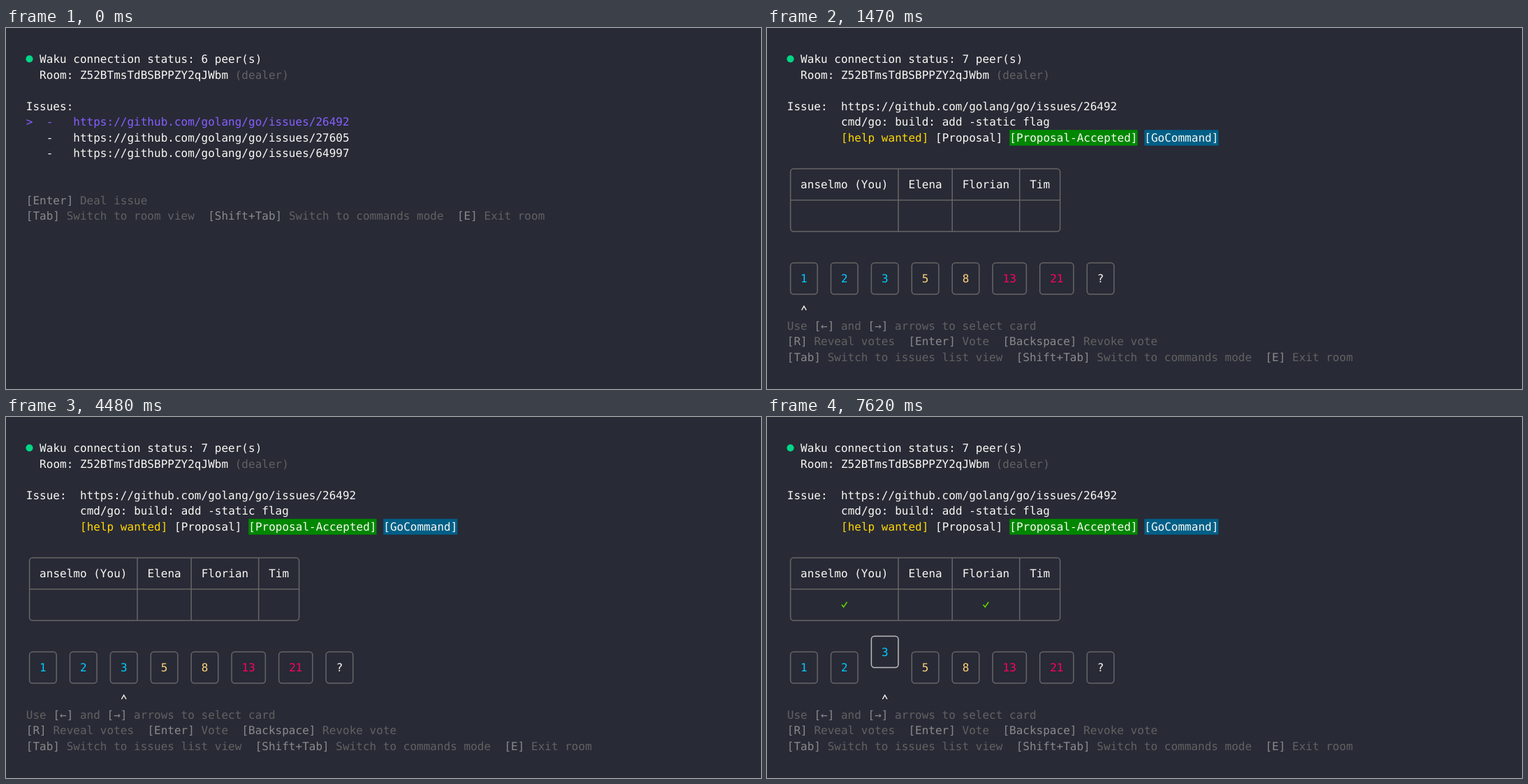
An HTML page that plays this animation: 1081 by 518 pixels, repeating every 8 s.

```html
<!DOCTYPE html>
<html lang="en">
<head>
<meta charset="utf-8">
<title>Planning poker in a terminal</title>
<style>
  html, body { margin: 0; width: 100%; height: 100%; overflow: hidden; background: #282a36; }
  svg { display: block; width: 100%; height: 100%; }
  text {
    font: 16.03px "DejaVu Sans Mono", "Noto Sans Mono", monospace;
    white-space: pre;
    text-rendering: geometricPrecision;
    font-variant-ligatures: none;
  }
  .line { fill: none; stroke-width: 1.5; }
</style>
</head>
<body>
<svg id="stage" viewBox="0 0 1081 518" xmlns="http://www.w3.org/2000/svg"></svg>
<script>
const LOOP = 8000;
const CELL = 9.65, ROW = 22.5, LEFT = 28.8, TOP = 44.5;
const C = {
  fg: '#f8f8f2', key: '#8a8a8a', dim: '#626262', border: '#666666', raised: '#bcbcbc',
  purple: '#875fff', cyan: '#00ccff', sand: '#ffd278', red: '#ff005f', gold: '#ffd700',
  green: '#008700', blue: '#005f87', check: '#5fd700', dot: '#00d787'
};

// [start time, value] steps
const PEERS = [[0, 6], [850, 7], [2350, 10], [2500, 7], [2830, 10], [3020, 7], [3500, 9],
  [3680, 10], [4480, 7], [4930, 8], [5100, 7], [6670, 8], [6870, 9], [7620, 7]];
const CURSOR = [[0, 0], [2930, 1], [3120, 2]];
const ROOM_AT = 570, TITLE_AT = 1470, VOTE_AT = 4630, OTHER_VOTE_AT = 6370;

const PLAYERS = [['anselmo (You)', 0], ['Elena', 16], ['Florian', 24], ['Tim', 34]];
const TABLE_END = 40;
const CARDS = [['1', 0, C.cyan], ['2', 6, C.cyan], ['3', 12, C.cyan], ['5', 18, C.sand],
  ['8', 24, C.sand], ['13', 30, C.red], ['21', 37, C.red], ['?', 44, C.fg]];
const REPO = 'https://github.com/golang/go/issues/';
const ISSUES = [26492, 27605, 64997];

const colX = col => LEFT + col * CELL;
const midX = col => colX(col + 0.5);
const rowY = row => TOP + row * ROW;
const valueAt = (steps, t) => steps.filter(s => s[0] <= t).pop()[1];

const span = (str, color) => `<tspan fill="${color}">${str}</tspan>`;
const text = (row, col, str, color = C.fg) =>
  `<text x="${colX(col)}" y="${rowY(row) + 5.7}" fill="${color}">${str}</text>`;
const path = (d, color, width = 1.5) =>
  `<path class="line" d="${d}" stroke="${color}" style="stroke-width:${width}"/>`;

// Dim help text with brighter [keys]
const help = (row, str) => text(row, 0, str.split(/(\[[^\]]+\])/)
  .map(s => span(s, s[0] === '[' ? C.key : C.dim)).join(''));

const box = (row, col, endCol, rows, color) =>
  `<rect class="line" x="${midX(col)}" y="${rowY(row)}" width="${(endCol - col) * CELL}" ` +
  `height="${rows * ROW}" rx="4.5" stroke="${color}"/>`;

const tag = (row, col, str, bg) =>
  `<rect x="${colX(col)}" y="${rowY(row) - 10.8}" width="${str.length * CELL}" height="22.6" fill="${bg}"/>` +
  text(row, col, str);

function checkMark(col) {
  const x = colX(col), y = rowY(10);
  return path(`M${x + 0.9} ${y - 0.2}L${x + 3.6} ${y + 3.2}L${x + 8.6} ${y - 4}`, C.check, 1.6);
}

function header(peers) {
  return `<circle cx="33.5" cy="44.3" r="5.1" fill="${C.dot}"/>` +
    text(0, 2, `Waku connection status: ${peers} peer(s)`) +
    text(1, 2, 'Room: Z52BTmsTdBSBPPZY2qJWbm ' + span('(dealer)', C.dim));
}

function issueList() {
  const rows = ISSUES.map((id, i) =>
    text(4 + i, 0, `${i ? ' ' : '&gt;'}  -   ${REPO}${id}`, i ? C.fg : C.purple));
  return text(3, 0, 'Issues:') + rows.join('') +
    help(9, '[Enter] Deal issue') +
    help(10, '[Tab] Switch to room view  [Shift+Tab] Switch to commands mode  [E] Exit room');
}

function issueDetails(loaded) {
  const link = text(3, 0, `Issue:  ${REPO}${ISSUES[0]}`);
  if (!loaded) return link + text(4, 10, 'fetching title', C.dim);
  return link +
    text(4, 8, 'cmd/go: build: add -static flag') +
    text(5, 8, span('[help wanted]', C.gold) + ' [Proposal]') +
    tag(5, 33, '[Proposal-Accepted]', C.green) +
    tag(5, 53, '[GoCommand]', C.blue);
}

function table(voted, otherVoted) {
  let grid = `M${midX(0)} ${rowY(9)}H${midX(TABLE_END)}`;
  for (const [, col] of PLAYERS.slice(1)) grid += `M${midX(col)} ${rowY(7)}V${rowY(11)}`;
  return box(7, 0, TABLE_END, 4, C.border) + path(grid, C.border) +
    PLAYERS.map(([name, col]) => text(8, col + 2, name)).join('') +
    (voted ? checkMark(8) : '') + (otherVoted ? checkMark(29) : '');
}

function cards(cursor, voted) {
  const x = midX(CARDS[cursor][1] + 2), y = rowY(16);
  return CARDS.map(([label, col, color], i) => {
    const up = voted && i === cursor, row = up ? 12 : 13;
    return box(row, col, col + 3 + label.length, 2, up ? C.raised : C.border) +
      text(row + 1, col + 2, label, color);
  }).join('') + path(`M${x - 3.3} ${y + 0.3}L${x} ${y - 5.4}L${x + 3.3} ${y + 0.3}`, C.fg, 1.3);
}

function room(s) {
  return issueDetails(s.loaded) + table(s.voted, s.otherVoted) + cards(s.cursor, s.voted) +
    help(17, 'Use [←] and [→] arrows to select card') +
    help(18, '[R] Reveal votes  [Enter] Vote  [Backspace] Revoke vote') +
    help(19, '[Tab] Switch to issues list view  [Shift+Tab] Switch to commands mode  [E] Exit room');
}

const stateAt = t => ({
  peers: valueAt(PEERS, t),
  cursor: valueAt(CURSOR, t),
  inRoom: t >= ROOM_AT,
  loaded: t >= TITLE_AT,
  voted: t >= VOTE_AT,
  otherVoted: t >= OTHER_VOTE_AT
});

const stage = document.getElementById('stage');
const start = performance.now();
let shown = '';

function draw() {
  const s = stateAt(Math.max(0, performance.now() - start) % LOOP);
  const key = JSON.stringify(s);
  if (key !== shown) {
    shown = key;
    stage.innerHTML = '<rect width="1081" height="518" fill="#282a36"/>' +
      header(s.peers) + (s.inRoom ? room(s) : issueList());
  }
  requestAnimationFrame(draw);
}
draw();
</script>
</body>
</html>
```
